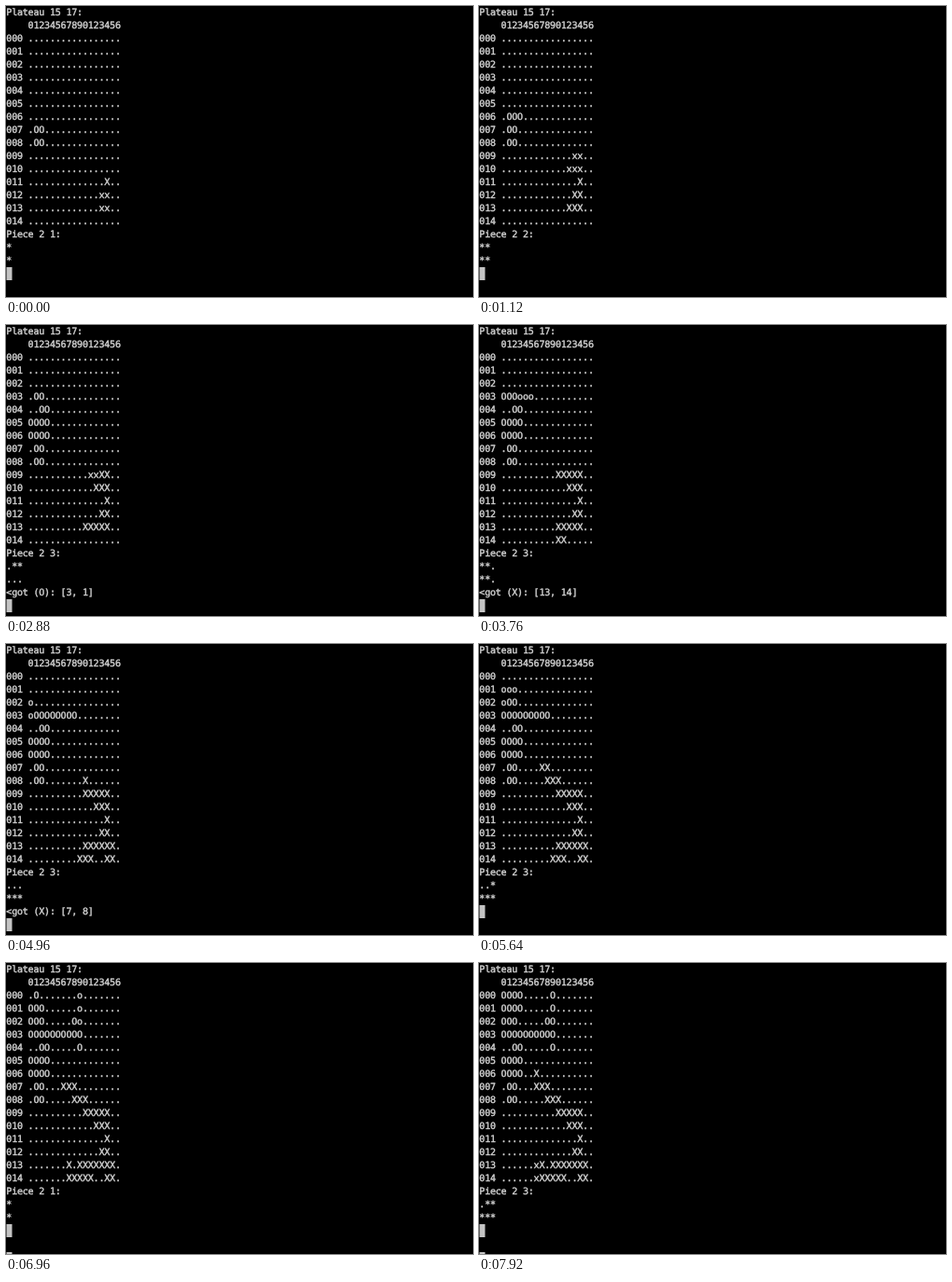
An HTML page with a canvas that plays this animation: 500x312 px, repeating every 8 s.

```html
<!DOCTYPE html>
<html lang="en">
<head>
<meta charset="utf-8">
<title>Terminal board game</title>
<style>
  html, body { margin: 0; height: 100%; overflow: hidden; background: #000; }
  canvas { display: block; }
</style>
</head>
<body>
<canvas id="screen" width="500" height="312"></canvas>
<script>
const LOOP = 8000, TICK = 40;
const ROWS = 15, COLS = 17;
const CHAR = 5.83, LINE = 14, BASELINE = 9.7, LEFT = 0.3;

// Alternating moves, O first: row, column, piece
const moves = `
6 1 */*|10 14 */*|6 2 */*|13 12 **/..|6 2 **/..|9 12 .**/***
5 0 **/**|13 11 **/..|5 2 **/.*|13 10 **/..|4 2 **/*.|9 12 **/..
3 1 **/.*|9 11 **/..|3 1 .**/...|9 10 **/..|3 0 **./...|13 10 *./**
3 3 ***/...|13 14 **./**.|3 5 ***/...|14 9 **/..|3 7 **/..|8 10 */*
2 0 */*|7 8 .../***|2 0 ***/...|7 7 **/.*|1 0 ***/*..|13 7 ..*/***
0 1 */*|13 7 */*|2 8 **/**/.*|7 6 **/..|0 9 */*/*|6 6 */*
0 0 **/..|14 6 **/..|0 1 ***/..*|13 6 */*|5 0 .**/***`
  .trim().split(/[|\n]/).map((text, i) => {
    const [row, col, piece] = text.split(' ');
    return { row: +row, col: +col, piece: piece.split('/'), player: 'OX'[i % 2] };
  });

// Move number and its start in ms; moves in between are evenly spaced
const pace = [
  [0, -80], [1, 120], [6, 1080], [7, 1280], [10, 1760], [13, 2400], [14, 2720],
  [15, 2960], [20, 3800], [25, 4840], [26, 5000], [28, 5360], [30, 5760],
  [31, 6040], [32, 6280], [33, 6600], [36, 7000], [37, 7280], [40, 7880]
];
const pieceDelay = { 14: 80, 32: 160 };
const answerDelay = 80;

function startOf(move) {
  const k = Math.max(1, pace.findIndex(([n]) => n >= move));
  const [n0, t0] = pace[k - 1], [n1, t1] = pace[k];
  return t0 + (t1 - t0) * (move - n0) / (n1 - n0);
}

function place(board, { row, col, piece, player }) {
  const next = board.map(line => [...line.toUpperCase()]);
  piece.forEach((line, r) => [...line].forEach((cell, c) => {
    if (cell === '*') next[row + r][col + c] = player.toLowerCase();
  }));
  return next.map(line => line.join(''));
}

// boards[i] is the position before move i
let board = Array(ROWS).fill('.'.repeat(COLS));
board = place(board, { row: 7, col: 1, piece: ['**', '**'], player: 'O' });
board = place(board, { row: 11, col: 14, piece: ['*'], player: 'X' });
board = place(board, { row: 12, col: 13, piece: ['**', '**'], player: 'X' });
const boards = [board];
moves.slice(0, -1).forEach((move, i) => boards.push(place(boards[i], move)));

const starts = moves.map((_, i) => startOf(i));
const firstTall = moves.findIndex(move => move.piece.length > 2);
const pieceTime = i => starts[i] + (pieceDelay[i] || TICK);
const answerTime = i => pieceTime(i) + answerDelay;

const ctx = document.getElementById('screen').getContext('2d');
ctx.font = '10px "DejaVu Sans Mono", monospace';
ctx.textRendering = 'geometricPrecision';
ctx.lineWidth = 0.4;
ctx.lineJoin = 'round';

function linesAt(time) {
  const i = starts.findLastIndex(start => start <= time);
  const { row, col, piece, player } = moves[i];
  const lines = [
    `Plateau ${ROWS} ${COLS}:`,
    '    ' + Array.from({ length: COLS }, (_, c) => c % 10).join(''),
    ...boards[i].map((line, r) => String(r).padStart(3, '0') + ' ' + line)
  ];
  if (time >= pieceTime(i)) lines.push(`Piece ${piece.length} ${piece[0].length}:`, ...piece);
  if (time >= answerTime(i)) lines.push(`<got (${player}): [${row}, ${col}]`);
  return lines;
}

function drawChar(char, x, y) {
  ctx.fillText(char, x, y);
  ctx.strokeText(char, x, y);
}

function draw(time) {
  const lines = linesAt(time);
  ctx.fillStyle = '#000';
  ctx.fillRect(0, 0, 500, 312);
  ctx.fillStyle = ctx.strokeStyle = '#d4d4d4';
  lines.forEach((line, y) => [...line].forEach((char, x) =>
    drawChar(char, LEFT + x * CHAR, y * LINE + BASELINE)));

  ctx.fillStyle = '#c4c4c4';
  if (lines.length * LINE < 308) ctx.fillRect(0.5, lines.length * LINE, 6, LINE);
  // A tall piece pushes the cursor to the bottom edge, where a sliver remains
  if (time >= answerTime(firstTall)) ctx.fillRect(0.5, 310, 6, 2);
}

const origin = performance.now();
function frame() {
  const time = (performance.now() - origin) % LOOP;
  draw(Math.floor(time / TICK) * TICK);
  requestAnimationFrame(frame);
}
frame();
</script>
</body>
</html>
```
